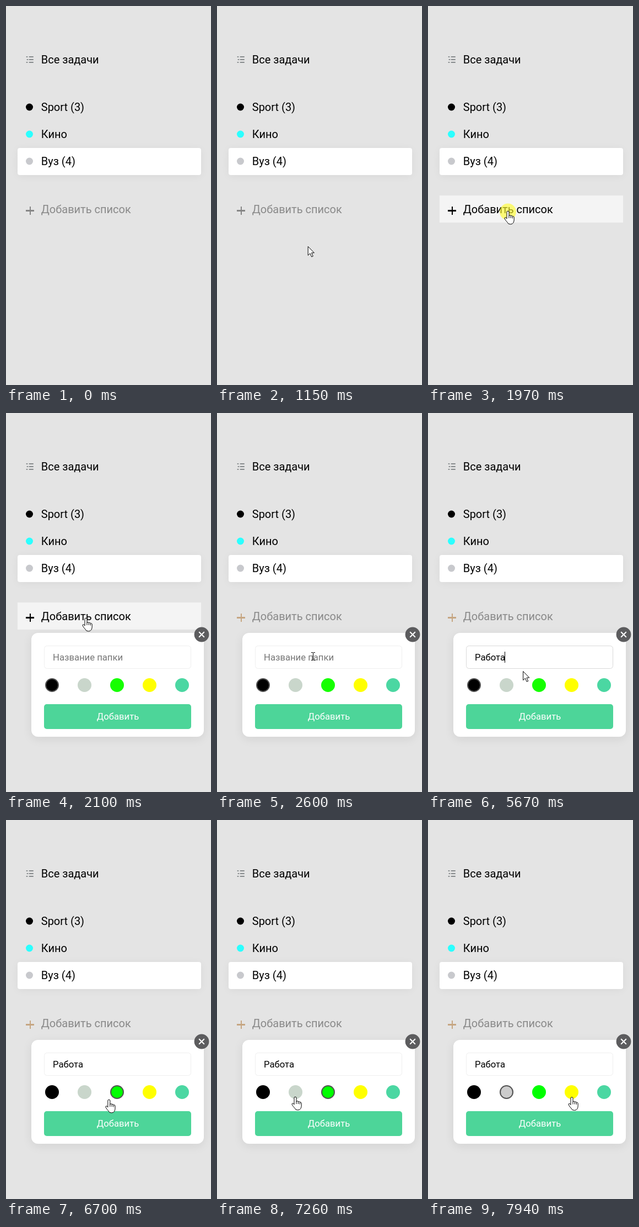
These frames come from a looping animation (372 by 686 pixels, 8000 ms). An HTML page with a canvas:

```html
<!DOCTYPE html>
<html lang="ru">
<head>
<meta charset="utf-8">
<title>Список задач</title>
<style>
html, body { margin: 0; width: 100%; height: 100%; overflow: hidden; background: #e4e4e4; }
canvas { display: block; width: 372px; height: 686px; }
</style>
</head>
<body>
<canvas id="stage"></canvas>
<script>
const W = 372, H = 686, LOOP = 8000;
const canvas = document.getElementById('stage');
const ctx = canvas.getContext('2d');
const dpr = window.devicePixelRatio || 1;
canvas.width = W * dpr;
canvas.height = H * dpr;

const FONT = 'Roboto, "Open Sans", sans-serif';
const TEXT_X = 63.75, INPUT_X = 85;
const WORD = 'Работа', TYPE_START = 3540, TYPE_STEP = 215;
const BLINK_START = 3270, BLINK = 533;
const HOVER = 1290, LEAVE = 2320;

// Each press shows a highlight; its effect follows on release
const HOLD = 130;
const PRESSES = [1970, 2800, 6300, 7320];
const [OPEN, FOCUS, PICK_GREEN, PICK_GREY] = PRESSES.map(t => t + HOLD);
const BLUR = PRESSES[2];

const START = { x: 329, y: 668 };
const MOVES = [
  { from: 590, to: 1570, x: 145, y: 372, bend: 55 },
  { from: 2180, to: 2600, x: 174.5, y: 440.5 },
  { from: 2730, to: 2800, x: 171.5, y: 437.5 },
  { from: 5400, to: 5670, x: 172, y: 467 },
  { from: 5670, to: 6090, x: 199, y: 488 },
  { from: 6430, to: 6700, x: 187, y: 507 },
  { from: 6700, to: 7260, x: 142, y: 502 },
  { from: 7730, to: 7940, x: 261, y: 502.5, bend: 17 }
];

const ARROW = new Path2D('M.5 .5V16.5L4.3 13L7 19.2L9.6 18.1L6.9 12H11.7Z');
const HAND = new Path2D('M-2 13V1Q-2-.8 0-.8T2 1V8Q2.2 6.5 4 6.7T5.4 8.2Q6 7.2 7.5 7.6T8.4 9.3' +
  'Q9.2 8.5 10.3 9T11.2 11V15Q11.2 18 9.8 20.3Q8.5 23 4.5 23Q0 23-1 19.5Q-4 16.5-5.8 13.2Q-6.5 11-4.8 10.8T-2 13Z');
const FINGERS = new Path2D('M2 8V12M5.4 8.2V12M8.4 9.3V12.5');
const BEAM = new Path2D('M-3.5-7H-.5M.5-7H3.5M0-6.5V6.5M-3.5 7H-.5M.5 7H3.5');

const clamp = v => Math.max(0, Math.min(1, v));
const mix = (a, b, k) => a + (b - a) * k;
const ramp = (t, from, length) => clamp((t - from) / length);
const easeOut = k => k * (2 - k);
const swatchX = i => 83.5 + i * 59;
const SWATCH_Y = 492.5;

function text(str, x, y, size, color, align = 'left') {
  ctx.font = `${size}px ${FONT}`;
  ctx.textAlign = align;
  ctx.fillStyle = color;
  ctx.fillText(str, x, y);
}

function box(x, y, w, h, r, color) {
  ctx.beginPath();
  ctx.roundRect(x, y, w, h, r);
  ctx.fillStyle = color;
  ctx.fill();
}

function shadowBox(x, y, w, h, r, blur, dy, alpha) {
  ctx.save();
  ctx.shadowColor = `rgba(0,0,0,${alpha})`;
  ctx.shadowBlur = blur * dpr;
  ctx.shadowOffsetY = dy * dpr;
  box(x, y, w, h, r, '#fff');
  ctx.restore();
}

function disc(x, y, r, color) {
  ctx.beginPath();
  ctx.arc(x, y, r, 0, Math.PI * 2);
  ctx.fillStyle = color;
  ctx.fill();
}

function drawList() {
  for (let i = 0; i < 3; i++) {
    const y = 91 + i * 5, indent = i % 2;
    box(36.5 + indent, y, 3, 2, 1, '#868a8c');
    box(41.5, y, 8.5, 2, 1, '#868a8c');
  }
  text('Все задачи', TEXT_X, 104, 20, '#000');

  shadowBox(21, 257, 333, 49, 4, 15, 2, 0.05);
  [['Sport (3)', '#000'], ['Кино', '#2bffff'], ['Вуз (4)', '#c8c9cd']].forEach(([label, color], i) => {
    const y = 183 + i * 49;
    disc(42.5, y, 6.5, color);
    text(label, TEXT_X, y + 7, 20, '#000');
  });
}

function drawAdd(t) {
  const hover = ramp(t, HOVER, 260) - ramp(t, LEAVE, 230);
  ctx.fillStyle = `rgba(255,255,255,${0.6 * hover})`;
  ctx.fillRect(21, 343, 333, 49);
  const idle = t > LEAVE ? [198, 166, 130] : [134, 134, 134];
  ctx.fillStyle = `rgb(${idle.map(c => Math.round(mix(c, 0, hover))).join()})`;
  ctx.fillRect(36, 369, 15, 3);
  ctx.fillRect(43, 363, 2, 15);
  text('Добавить список', TEXT_X, 375, 20, `rgba(0,0,0,${mix(0.4, 1, hover)})`);
}

function drawInput(t) {
  const focus = ramp(t, FOCUS, 70) - ramp(t, BLUR, 140);
  const edge = Math.round(mix(239, 217, focus));
  ctx.beginPath();
  ctx.roundRect(69.5, 421.5, 266, 41, 5);
  ctx.strokeStyle = `rgb(${edge},${edge},${edge})`;
  ctx.lineWidth = 1;
  ctx.stroke();

  const typed = Math.max(0, 1 + Math.floor((t - TYPE_START) / TYPE_STEP));
  const value = WORD.slice(0, typed);
  text(value || 'Название папки', INPUT_X, 448, 16.67, value ? '#000' : '#757575');

  const caretOn = Math.floor((t - BLINK_START) / BLINK) % 2 === 0;
  if (caretOn && t >= BLINK_START && t < BLUR) {
    const x = INPUT_X + ctx.measureText(value).width;
    ctx.fillStyle = '#000';
    ctx.fillRect(Math.floor(x), 432, 1, 20);
  }
}

function drawPopup(t) {
  shadowBox(46, 398, 313, 188, 12, 18, 4, 0.08);
  drawInput(t);

  const picked = t < PICK_GREEN ? 0 : t < PICK_GREY ? 2 : 1;
  const colors = ['#000', picked === 1 ? '#ccc' : '#c9d6cb', picked ? '#0f0' : '#16ff00', '#ff0', '#4bd7a2'];
  colors.forEach((color, i) => {
    disc(swatchX(i), SWATCH_Y, 12.5, i === picked ? '#525252' : color);
    if (i === picked) disc(swatchX(i), SWATCH_Y, 10.5, color);
  });

  box(69, 527, 267, 45, 5, '#4dd599');
  text('Добавить', 203, 555, 16.67, '#fff', 'center');

  disc(355, 401, 13.4, '#5c5c5e');
  ctx.strokeStyle = '#fff';
  ctx.lineWidth = 2;
  ctx.beginPath();
  for (const side of [-1, 1]) {
    ctx.moveTo(355 - 4.8 * side, 396.2);
    ctx.lineTo(355 + 4.8 * side, 405.8);
  }
  ctx.stroke();
}

// Moves run along quadratic curves bent sideways by `bend`
function pointerAt(t) {
  let { x, y } = START;
  for (const m of MOVES) {
    if (t < m.from) break;
    const k = easeOut(ramp(t, m.from, m.to - m.from));
    const dx = m.x - x, dy = m.y - y;
    const side = 2 * k * (1 - k) * (m.bend || 0) / Math.hypot(dx, dy);
    x += dx * k + dy * side;
    y += dy * k - dx * side;
  }
  return [x, y];
}

function pointerShape(t, x, y) {
  if (y > 343 && y < 392) return 'hand';
  if (t < OPEN) return 'arrow';
  if (y > 421 && y < 463) return 'beam';
  const near = [0, 1, 2, 3, 4].some(i => Math.hypot(x - swatchX(i), y - SWATCH_Y) < 21);
  return near ? 'hand' : 'arrow';
}

function drawPointer(t) {
  if (t < MOVES[0].from) return;
  const [x, y] = pointerAt(t);
  if (PRESSES.some(p => t >= p && t < p + HOLD)) disc(x, y + 0.5, 15, 'rgba(255,252,40,0.62)');

  const shape = pointerShape(t, x, y);
  ctx.save();
  ctx.translate(x, y);
  ctx.lineWidth = 1;
  ctx.strokeStyle = '#000';
  ctx.fillStyle = '#fff';
  if (shape === 'beam') {
    ctx.stroke(BEAM);
  } else {
    const outline = shape === 'hand' ? HAND : ARROW;
    ctx.fill(outline);
    ctx.stroke(outline);
    if (shape === 'hand') ctx.stroke(FINGERS);
  }
  ctx.restore();
}

function frame() {
  const t = performance.now() % LOOP;
  ctx.setTransform(dpr, 0, 0, dpr, 0, 0);
  ctx.fillStyle = '#e4e4e4';
  ctx.fillRect(0, 0, W, H);
  drawList();
  drawAdd(t);
  if (t >= OPEN) drawPopup(t);
  drawPointer(t);
  requestAnimationFrame(frame);
}
frame();
</script>
</body>
</html>
```
